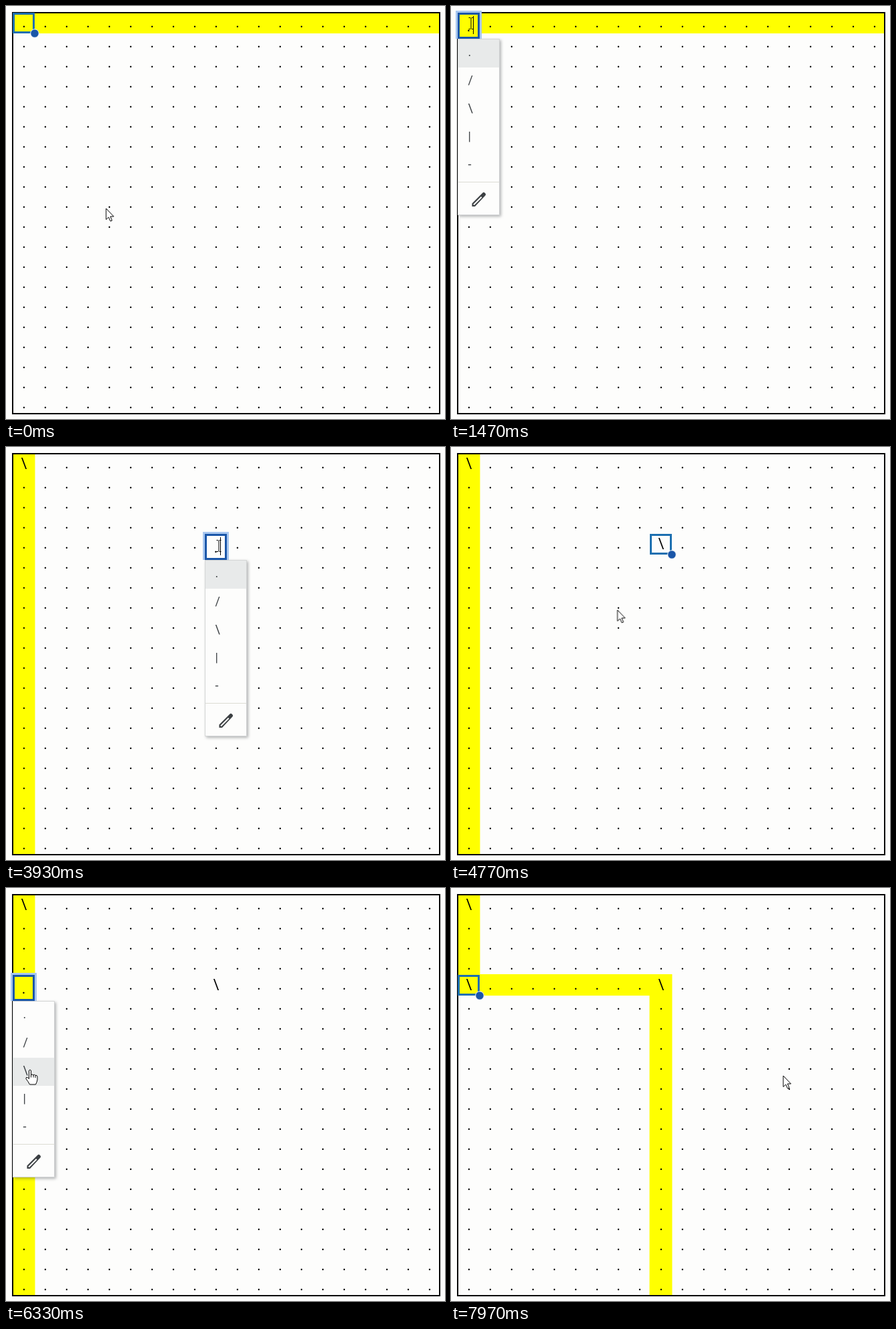
An HTML page for the animation above (8000 ms loop, 658 px wide and 618 px high).

```html
<!DOCTYPE html>
<html lang="en">
<head>
<meta charset="utf-8">
<title>Grid editing</title>
<style>
  :root { --paper: #fdfdfc; --yellow: #ff0; --blue: #1a56a8; --ink: #3c4043; }
  html, body { margin: 0; width: 100%; height: 100%; overflow: hidden; background: var(--paper); }
  svg { display: block; width: 658px; height: 618px; }
  text { font-family: Roboto, "Liberation Sans", sans-serif; font-size: 21.33px; text-anchor: middle; }
  .menu text { font-size: 18px; text-anchor: start; fill: var(--ink); }
  .menu { filter: drop-shadow(2px 2px 2px rgba(60, 64, 67, .4)); }
  .band { fill: var(--yellow); }

  /* 1% = 80 ms; everything jumps except the pointer */
  .anim { animation: 8s step-end infinite; }

  #row { animation-name: row; }
  @keyframes row { 0% { opacity: 1 } 30%, to { opacity: 0 } }
  #column { animation-name: column; }
  @keyframes column { 0% { opacity: 0 } 30% { opacity: 1 } 85.375%, to { opacity: 0 } }
  #bent { animation-name: bent; }
  @keyframes bent { 0% { opacity: 0 } 85.375%, to { opacity: 1 } }

  .cell .before { opacity: calc(1 - var(--set)); }
  .cell .after { opacity: var(--set); }
  #cell1 { animation-name: set1; }
  #cell2 { animation-name: set2; }
  #cell3 { animation-name: set3; }
  @keyframes set1 { 0% { --set: 0 } 23.25%, to { --set: 1 } }
  @keyframes set2 { 0% { --set: 0 } 58%, to { --set: 1 } }
  @keyframes set3 { 0% { --set: 0 } 80.5%, to { --set: 1 } }

  .place { animation-name: place; }
  @keyframes place {
    0% { transform: none; --fill: var(--yellow) }
    43.5% { transform: translate(288px, 120px); --fill: var(--paper) }
    66.75%, to { transform: translate(0, 120px); --fill: var(--yellow) }
  }
  #handle { animation-name: handle; }
  @keyframes handle {
    0%, 23.25%, 44.5%, 58%, 68.5%, 80.5%, to { opacity: 1 }
    17.5%, 43.5%, 47.5%, 66.75%, 72.25% { opacity: 0 }
  }
  #editor { animation-name: editor; }
  @keyframes editor {
    0%, 23.25%, 58%, 80.5%, to { opacity: 0 }
    17.5%, 47.5%, 72.25% { opacity: 1 }
  }
  #caret { animation-name: caret; }
  @keyframes caret { 0%, 58% { opacity: 1 } 51.625%, 78.5%, to { opacity: 0 } }
  #hover { animation-name: hover; }
  @keyframes hover {
    0%, 30%, 62% { transform: none }
    21.2%, 55%, 75.5% { transform: translateY(42px) }
    21.8%, 56%, 76.6%, to { transform: translateY(84px) }
  }

  #pointer { animation: move 8s linear infinite; }
  @keyframes move {
    0%, .375% { transform: translate(150px, 303px) }
    5% { transform: translate(110px, 220px) }
    12%, 19% { transform: translate(30px, 26px) }
    22%, 23.25% { transform: translate(36px, 153px) }
    26.25%, 30% { transform: translate(230px, 372px) }
    37.8%, 38.7% { transform: translate(306px, 219px) }
    43%, 53.75% { transform: translate(319px, 148px) }
    56.8%, 58% { transform: translate(324px, 273px) }
    63.8%, 64.1% { transform: translate(60px, 170px) }
    66.5%, 73% { transform: translate(18px, 149px) }
    77.5%, 80.5% { transform: translate(36px, 273px) }
    84%, 94.1% { transform: translate(36px, 300px) }
    97% { transform: translate(290px, 276px) }
    99.5%, to { transform: translate(498px, 281px) }
  }
  #arrow { animation-name: arrow; }
  #beam { animation-name: beam; }
  #hand { animation-name: hand; }
  @keyframes arrow {
    0%, 23.25%, 58%, 80.5%, to { opacity: 1 }
    17.5%, 47.5%, 72.25% { opacity: 0 }
  }
  @keyframes beam {
    0%, 20.5%, 54.5%, 75%, to { opacity: 0 }
    17.5%, 47.5%, 72.25% { opacity: 1 }
  }
  @keyframes hand {
    0%, 23.25%, 58%, 80.5%, to { opacity: 0 }
    20.5%, 54.5%, 75% { opacity: 1 }
  }
</style>
</head>
<body>
<svg viewBox="0 0 658 618">
  <rect id="row" class="band anim" x="11" y="11" width="638" height="30"/>
  <rect id="column" class="band anim" x="11" y="11" width="32.5" height="598"/>
  <path id="bent" class="band anim" d="M11 11H43.5V129H331.5V609H297.5V161H11Z"/>
  <rect x="10" y="10" width="640" height="600" fill="none" stroke="#000" stroke-width="2"/>
  <g id="grid"></g>

  <g class="anim place">
    <rect x="11.5" y="11.5" width="30" height="28" fill="none" stroke="#1c6fb0" stroke-width="3"/>
    <circle id="handle" class="anim" cx="43" cy="41" r="6.3" fill="#1a56a8" stroke="#fdfdfc"/>
  </g>

  <g id="editor" class="anim">
    <g class="anim place">
      <g class="menu">
        <rect x="10.5" y="49.5" width="62" height="263" fill="#fdfdfc" stroke="#d4d6d6"/>
        <rect id="hover" class="anim" x="11" y="50" width="61" height="42" fill="#e8eaea"/>
        <g id="options"></g>
        <path d="M11 263.5H72" stroke="#dcdcd4"/>
        <path d="M31.5 300V295.5L47.5 279.5Q49 278 50.5 279.5L51.5 280.5Q53 282 51.5 283.5L36 300Z" fill="#3c4043"/>
        <path d="M34 297.5L45.8 285.7" stroke="#fdfdfc" stroke-width="2"/>
      </g>
      <path d="M8.5 49V8.5H44.5V49" fill="none" stroke="#a8c7f0" stroke-width="3"/>
      <rect x="11.5" y="11.5" width="30" height="36" style="fill: var(--fill)" stroke="#1a56a8" stroke-width="3"/>
      <text x="26.5" y="38">.</text>
      <path id="caret" class="anim" d="M33.5 15V42" stroke="#000"/>
    </g>
  </g>

  <g id="pointer">
    <path id="arrow" class="anim" d="M0 0V16.5L3.8 13L6.5 19L9 18L6.4 12H11.5Z" fill="#fff" stroke="#000"/>
    <path id="beam" class="anim" d="M-3.5 -8.5H-1L0 -7.5L1 -8.5H3.5M0 -7.5V7.5M-3.5 8.5H-1L0 7.5L1 8.5H3.5" fill="none" stroke="#000"/>
    <path id="hand" class="anim" fill="#fff" stroke="#000" stroke-linejoin="round"
      d="M-1.5 0Q0 -2 1.5 0V7Q3 4.5 5 7Q7 5 8 7.5Q10.5 6.5 11 9V14Q10.5 17 8.5 21H-.5Q-2.5 17 -6 12.5Q-6.5 9.5 -3.5 10.5L-1.5 12.5ZM1.5 7V10.5M5 7V10.5M8 7.5V11"/>
  </g>
</svg>
<script>
  const SVG = "http://www.w3.org/2000/svg";
  const grid = document.getElementById("grid");

  function add(parent, tag, attrs, content = "") {
    const el = document.createElementNS(SVG, tag);
    for (const name in attrs) el.setAttribute(name, attrs[name]);
    el.textContent = content;
    return parent.appendChild(el);
  }

  // Cells whose dot turns into a backslash, keyed by column and row
  const mirrors = { "0,0": "cell1", "9,4": "cell2", "0,4": "cell3" };

  for (let row = 0; row < 20; row++) {
    for (let col = 0; col < 20; col++) {
      const at = { x: 27 + col * 32, y: 32 + row * 30 };
      const id = mirrors[[col, row]];
      if (!id) {
        add(grid, "text", at, ".");
        continue;
      }
      const cell = add(grid, "g", { id, class: "cell anim" });
      add(cell, "text", { ...at, class: "before" }, ".");
      add(cell, "text", { ...at, class: "after" }, "\\");
    }
  }

  const options = document.getElementById("options");
  [".", "/", "\\", "|", "-"].forEach((mark, i) =>
    add(options, "text", { x: 25.5, y: 75 + 42 * i }, mark));
</script>
</body>
</html>
```
